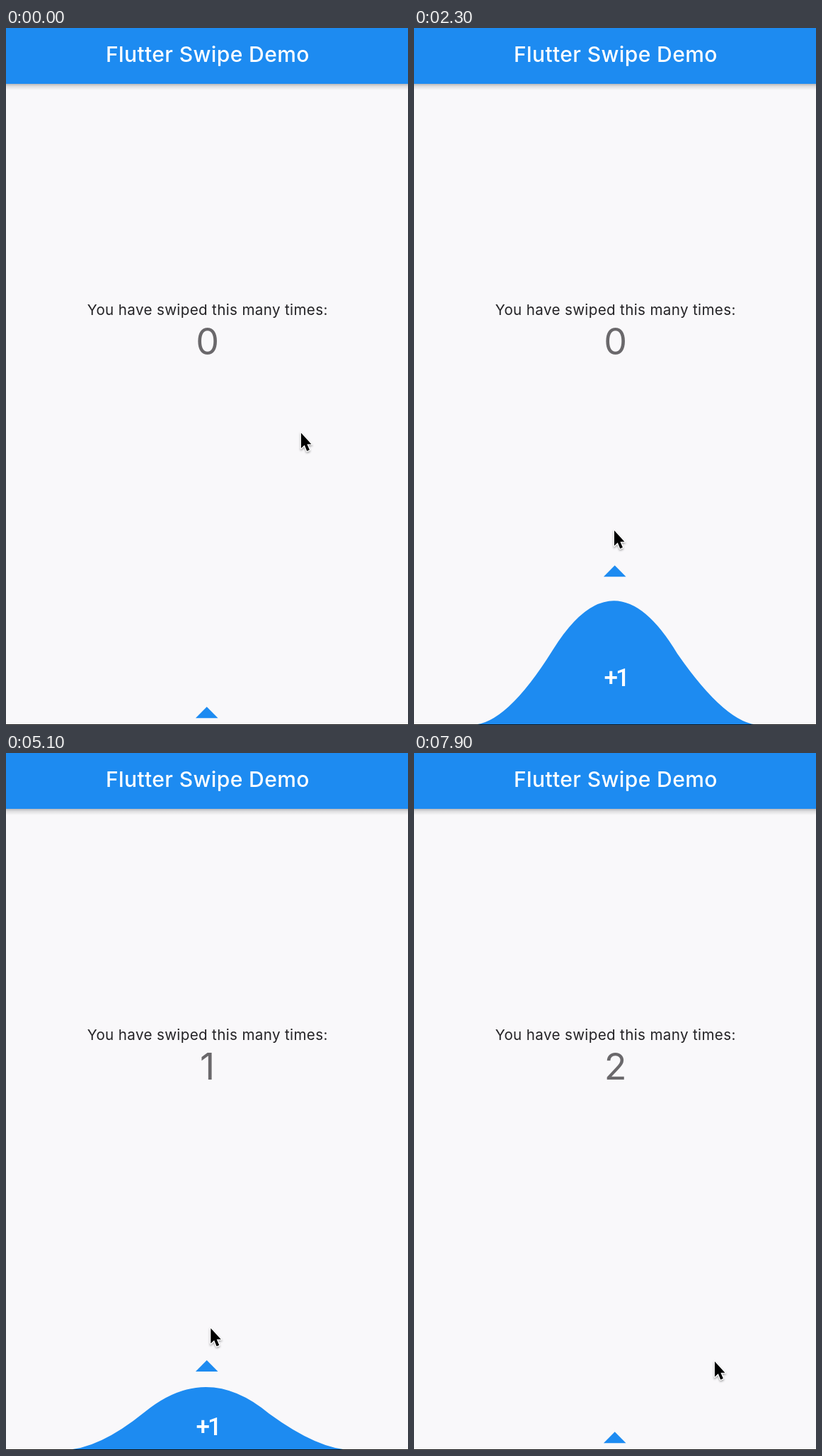
An HTML page for the animation above (8 s loop, 568x986 px).

```html
<!DOCTYPE html>
<html lang="en">
<head>
<meta charset="utf-8">
<title>Swipe demo</title>
<style>
  html, body { margin: 0; width: 100%; height: 100%; overflow: hidden; background: #f9f8fa; }
  svg { display: block; width: 100%; height: 100%; }
  text { font-family: Inter, "Noto Sans", sans-serif; text-anchor: middle; }
  #title { font-size: 30px; font-weight: 500; letter-spacing: .4px; }
  #label { font-size: 20.6px; letter-spacing: .35px; }
  #count { font-size: 52px; }
  #plus { font: 500 35px Roboto, sans-serif; letter-spacing: -3px; text-anchor: start; }
</style>
</head>
<body>
<svg viewBox="0 0 568 986" xmlns="http://www.w3.org/2000/svg">
  <defs>
    <linearGradient id="shade" x1="0" y1="0" x2="0" y2="1">
      <stop offset="0" stop-opacity=".26"/>
      <stop offset=".4" stop-opacity=".1"/>
      <stop offset="1" stop-opacity="0"/>
    </linearGradient>
    <filter id="soft" x="-50%" y="-50%" width="200%" height="200%">
      <feGaussianBlur stdDeviation="1.5"/>
    </filter>
    <path id="arrow" d="M1 2V25.5L6.3 20.6L10 29.8L14 28.1L10.2 19.2H16.8Z"/>
  </defs>

  <rect width="568" height="986" fill="#f9f8fa"/>
  <rect y="79" width="568" height="9" fill="url(#shade)"/>
  <rect width="568" height="79" fill="#1d8bf1"/>
  <text id="title" x="284.9" y="47.5" fill="#fff">Flutter Swipe Demo</text>
  <text id="label" x="284.7" y="406" fill="#242326">You have swiped this many times:</text>
  <text id="count" x="284.7" y="461.5" fill="#6a686b">0</text>

  <path id="hill" fill="#1d8bf1"/>
  <text id="plus" x="268.5" fill="#fff">+1</text>
  <path id="tip" d="M283.7 960.2L299.5 976.2H267.9Z" fill="#1d8bf1"/>
  <rect y="985" width="568" height="1" fill="#111"/>

  <g id="cursor">
    <g transform="scale(.92)">
      <use href="#arrow" y="2" opacity=".4" stroke="#000" stroke-width="2" filter="url(#soft)"/>
      <use href="#arrow" fill="#fff" stroke="#fff" stroke-width="3" stroke-linejoin="round"/>
      <use href="#arrow"/>
    </g>
  </g>
</svg>
<script>
const LOOP = 8000, STEP = 100, FLOOR = 986, FALL = 400;
const el = id => document.getElementById(id);
const count = el('count'), hill = el('hill'), plus = el('plus'), tip = el('tip'), cursor = el('cursor');

const home = { x: 416, y: 571 };
const glides = [
  { from: 0, to: 200, x: 316, y: 770 },
  { from: 400, to: 900, x: 284, y: 970 },
  { from: 1200, to: 2300, x: 282, y: 709 },
  { from: 2400, to: 2900, x: 299, y: 562 },
  { from: 3450, to: 4400, x: 280, y: 966 },
  { from: 4450, to: 5600, x: 294, y: 708 },
  { from: 6500, to: 7000, x: 318, y: 577 },
  { from: 7200, to: 7500, x: 424, y: 859 }
];
const swipes = [
  { grab: 1400, peak: 2300, release: 2400, height: 200 },
  { grab: 4600, peak: 5600, release: 6500, height: 202.5 }
];

const progress = (t, a, b) => Math.min(1, Math.max(0, (t - a) / (b - a)));
const smooth = p => p * p * (3 - 2 * p);

function pointerAt(t) {
  return glides.reduce((pos, g) => {
    const p = smooth(progress(t, g.from, g.to));
    return { x: pos.x + (g.x - pos.x) * p, y: pos.y + (g.y - pos.y) * p };
  }, home);
}

function liftAt(t) {
  return swipes.reduce((sum, s) => {
    const rise = smooth(progress(t, s.grab, s.peak));
    const fall = (1 - progress(t, s.release, s.release + FALL)) ** 3;
    return sum + s.height * rise * fall;
  }, 0);
}

function hillPath(lift) {
  const y = k => FLOOR - k * lift / 200;
  return `M81 ${FLOOR}Q130 ${FLOOR} 196 ${y(106)}Q284 ${y(248)} 372 ${y(101)}Q442 ${FLOOR} 489 ${FLOOR}Z`;
}

function draw(ms) {
  const t = Math.floor(ms % LOOP / STEP) * STEP;
  const { x, y } = pointerAt(t), lift = liftAt(t);
  cursor.setAttribute('transform', `translate(${x} ${y})`);
  tip.setAttribute('transform', `translate(0 ${-lift})`);
  hill.setAttribute('d', lift ? hillPath(lift) : '');
  plus.setAttribute('y', FLOOR + 13 - 0.34 * lift);
  plus.setAttribute('opacity', Math.min(1, lift / 100));
  count.textContent = swipes.filter(s => t > s.release).length;
}

const start = performance.now();
function tick() {
  draw(performance.now() - start);
  requestAnimationFrame(tick);
}
tick();
</script>
</body>
</html>
```
